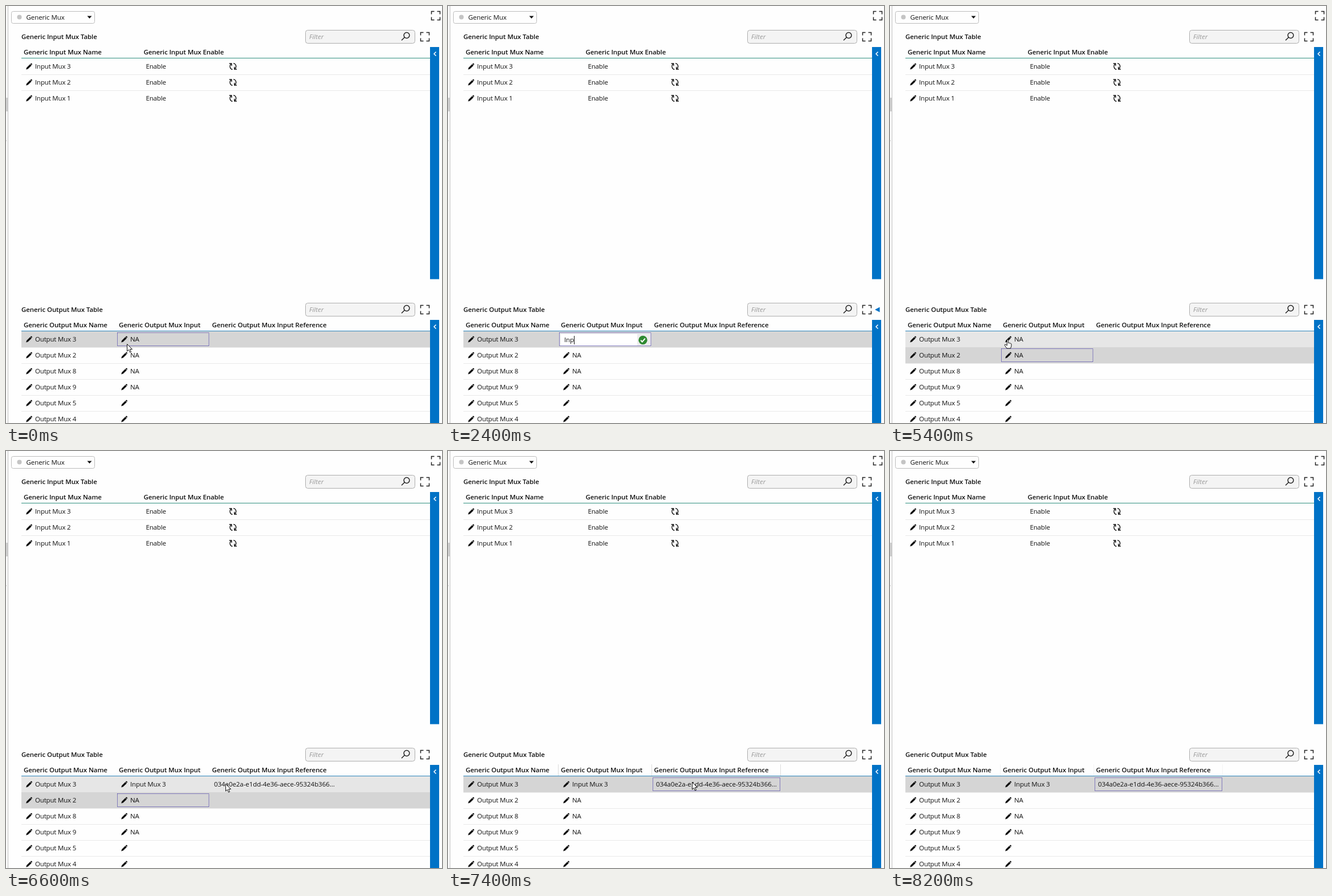
Recreate the animation shown at these times as an HTML page. Size 765 px wide and 732 px high, loop 8.6 s.

```html
<!DOCTYPE html>
<html lang="en">
<head>
<meta charset="utf-8">
<title>Mux tables</title>
<style>
html, body { margin: 0; width: 100%; height: 100%; overflow: hidden; background: #fefefe; }
svg { display: block; }
text { font: 11.5px "Open Sans", "Noto Sans", sans-serif; letter-spacing: -.18px; fill: #111; white-space: pre; }
.head { font-weight: 600; letter-spacing: -.1px; }
.wide { letter-spacing: -.06px; }
.hint { font-style: italic; letter-spacing: 0; fill: #9a9a9a; }
.line { fill: none; stroke: #222; stroke-width: 1.5; }
.focus { fill: none; stroke: #2c1fa0; stroke-dasharray: 1 1; }
</style>
</head>
<body>
<svg id="stage" width="765" height="732" viewBox="0 0 765 732"></svg>
<script>
const LOOP = 8600, STEP = 200;
const ROW = 28, OUT_TOP = 571;
const OUTPUTS = [3, 2, 8, 9, 5, 4];
const GUID = "034a0e2a-e1dd-4e36-aece-95324b366...";
const stage = document.getElementById("stage");

const rect = (x, y, w, h, fill, more = "") =>
  `<rect x="${x}" y="${y}" width="${w}" height="${h}" fill="${fill}" ${more}/>`;
const text = (x, y, s, cls = "") => `<text x="${x}" y="${y}" class="${cls}">${s}</text>`;
const path = (x, y, d, more = 'class="line"') =>
  `<path transform="translate(${x} ${y})" d="${d}" ${more}/>`;

const pencil = (x, y) => path(x, y,
  "M-5.3 5.5l.9-3.3 6.3-6.2 2.4 2.4-6.3 6.2zM2.3-4.4l1-.9q.6-.4 1.1 0l.9.9q.4.5 0 1.1l-.9 1z", 'fill="#111"');
const expand = (x, y) => path(x, y, "M0 5V0H5M10 0H15V5M15 10V15H10M5 15H0V10");
const refresh = (x, y) => {
  const half = "M-.8 5.4A5.4 5.4 0 0 1-3.4-4.1M-6.6-5H-2.4V-.8";
  const thin = 'fill="none" stroke="#111" stroke-width="1.3"';
  return path(x, y, half, thin) + `<g transform="rotate(180 ${x} ${y})">${path(x, y, half, thin)}</g>`;
};

const pointers = {
  arrow: "M0 0V12.6L2.9 9.9 5 14.6 7 13.7 5 9.1H9z",
  hand: "M-1.2 1Q0-.6 1.2 1V6L3 6.2 5 6.7 6.4 7.6V11.5L5 15.5H-1.5L-5.5 9.8Q-5.2 8-3.4 8.8L-1.2 10.5z"
};
const pointer = ([, kind, x, y]) => kind ? path(x, y, pointers[kind],
  'fill="#fff" stroke="#111" stroke-width="1" stroke-linejoin="round"') : "";

// Title, filter box and side bar shared by both tables.
function panel(y, title, heads, barEnd, lineColor) {
  return text(27, y + 58, title, "head") +
    rect(525.5, y + 42.5, 192, 23, "#f4f4f4", 'rx="4" stroke="#adadad"') +
    text(532, y + 58, "Filter", "hint") +
    `<circle cx="703" cy="${y + 51.5}" r="4.9" class="line"/>` +
    path(699.4, y + 55, "M0 0L-5.4 5.2") +
    expand(727.5, y + 46.5) +
    heads.map(([x, s]) => text(x, y + 85, s, "head")).join("") +
    rect(27, y + 91, 717, 1, lineColor) +
    rect(744, y + 72, 16, barEnd - y - 72, "#0072c6") +
    path(754.5, y + 80.5, "M0 0L-3.5 3.5 0 7", 'fill="none" stroke="#fff" stroke-width="1.5"');
}

function inputTable() {
  return panel(0, "Generic Input Mux Table",
    [[31, "Generic Input Mux Name"], [241.5, "Generic Input Mux Enable"]], 479.5, "#2f8f7f") +
    [3, 2, 1].map((n, i) => {
      const y = 106 + i * ROW;
      return pencil(40.5, y) + text(51, y + 4, "Input Mux " + n) +
        text(245.5, y + 4, "Enable") + refresh(398.3, y) +
        (i < 2 ? rect(27, y + 14, 717, 1, "#e9e9e9") : "");
    }).join("");
}

// Time, pointer shape, tip position.
const moves = [
  [0, "arrow", 212.5, 593.5], [200, "arrow", 211.5, 591.5], [400, "arrow", 209.5, 587.5],
  [600, "hand", 207.5, 584.5], [800, "hand", 207.5, 582.5], [1200, ""],
  [5400, "hand", 206.5, 585.5], [6200, "arrow", 330.5, 606.5], [6600, "arrow", 385.5, 584.5],
  [6800, "arrow", 415.5, 563.5], [7000, "arrow", 427.5, 566.5], [7200, "arrow", 428.5, 577.5],
  [7400, "arrow", 428.5, 581.5], [7600, "arrow", 430.5, 592.5], [7800, "arrow", 434.5, 646.5],
  [8000, "arrow", 438.5, 692.5], [8200, ""]
];

function typed(t) {
  if (t < 2000) return "NA";
  const pause = t >= 3600 ? 200 : 0;
  const keys = 1 + Math.floor((t - 2000 - pause) / STEP);
  return "Input Mux ".slice(0, t >= 3200 && t < 3600 ? 7 : keys);
}

function editor(t) {
  return rect(196, 574, 160, 23, "#ececec") + rect(198, 576, 134, 20, "#fff") +
    `<text id="entry" x="204" y="590">${typed(t)}</text>` +
    (t < 4800 ? rect(204, 579, 1, 15, "#111", 'id="caret"') : "") +
    '<circle cx="342" cy="586.5" r="7.7" fill="#2f8a32"/>' +
    path(342, 586.5, "M-3.8 .2L-1.2 3 3.8-2.8", 'fill="none" stroke="#fff" stroke-width="2"');
}

function outputTable(t, [, kind, x, y]) {
  const editing = t >= 1200 && t < 5200;
  const linked = t >= 5800;
  const selected = t >= 5200 && t < 7400 ? 1 : 0;
  const hover = kind ? Math.floor((y - OUT_TOP) / ROW) : -9;
  const overHead = kind && y < OUT_TOP;
  let s = "";

  if (overHead) s += rect(357, 550, 227, 20, "#e6e6e6");
  if (t >= 6800)
    for (const edge of [193, 357, 583]) s += rect(edge, 550, 1, 20, t < 8000 ? "#dcdcdc" : "#f3f3f3");

  OUTPUTS.forEach((n, i) => {
    const top = OUT_TOP + i * ROW, mid = top + 14;
    const fill = i === selected ? "#d5d5d5" : i === hover ? "#e6e6e6" : "";
    s += rect(27, top + 28, 717, 1, "#e9e9e9");
    if (fill) s += rect(27, top, 717, 28, fill);
    s += pencil(40.5, mid) + text(51, mid + 4, "Output Mux " + n);
    if (i || !editing) {
      s += pencil(207.5, mid);
      if (i < 4) s += text(218, mid + 4, !i && linked ? "Input Mux 3" : "NA");
    }
  });

  if (editing) s += editor(t) + path(749, 533, "M0 0L8.5-4.5V4.5z", 'fill="#0072c6"');
  if (linked) s += text(365, 589, GUID, "wide");

  const inRef = t >= 7400;
  s += rect(inRef ? 359.5 : 195.5, OUT_TOP + selected * ROW + 2.5,
    inRef ? 223 : 160.5, 23, "none", 'class="focus"');

  return s + panel(479, "Generic Output Mux Table",
    [[31, "Generic Output Mux Name"], [198, "Generic Output Mux Input"],
     [361.5, "Generic Output Mux Input Reference"]], 732, "#2d86bd");
}

const frameParts = rect(0, 0, 765, 732, "#fefefe") +
  rect(3, 0, 1, 732, "#bdbdbd") + rect(0, 161, 3, 24, "#cfcfcf") + rect(0, 236, 1, 1, "#aaa") +
  rect(9.5, 9.5, 146, 21, "#fefefe", 'rx="3" stroke="#bcbcbc"') +
  '<circle cx="23.5" cy="19.5" r="4" fill="#c4c4c4"/>' +
  text(35.5, 24, "Generic Mux", "wide") +
  path(142.5, 17.5, "M0 0H8L4 4.5z", 'fill="#111"') +
  expand(746.5, 9.5) + inputTable();

function draw(t) {
  const mouse = moves.findLast(m => m[0] <= t);
  stage.innerHTML = frameParts + outputTable(t, mouse) + pointer(mouse);
  const caret = document.getElementById("caret");
  if (caret) {
    const width = document.getElementById("entry").getComputedTextLength();
    caret.setAttribute("x", Math.round(204 + width));
  }
}

let shown = -1;
const start = performance.now();
function tick() {
  const t = Math.floor((performance.now() - start) % LOOP / STEP) * STEP;
  if (t !== shown) draw(shown = t);
  requestAnimationFrame(tick);
}
tick();
</script>
</body>
</html>
```
